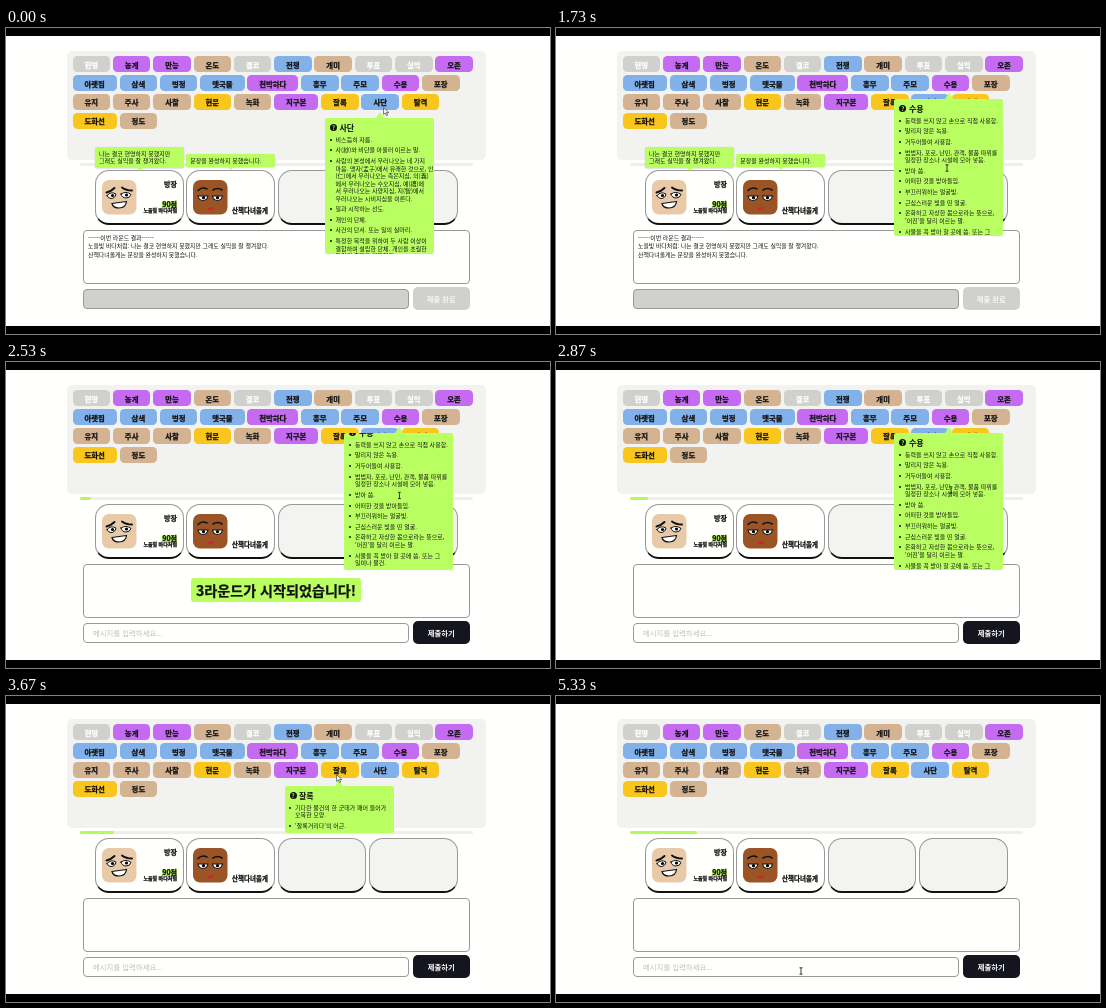
Recreate the animation shown at these times as an HTML page. Size 544 by 306 pixels, loop 5.39 s.

```html
<!DOCTYPE html>
<html lang="ko">
<head>
<meta charset="utf-8">
<title>Word game</title>
<style>
html, body { margin: 0; width: 100%; height: 100%; overflow: hidden; background: #000; }
#stage { position: absolute; left: 0; top: 0; width: 544px; height: 306px; overflow: hidden; background: #000;
  font-family: "Noto Sans CJK KR", "Noto Sans CJK", "Noto Sans", sans-serif; font-size: 6px; color: #111; }
#stage div, #stage svg { position: absolute; box-sizing: border-box; white-space: pre; }
.mid { display: flex; align-items: center; justify-content: center; }
.heavy { font-weight: 900; -webkit-text-stroke: .25px; }
.chip { border-radius: 4.5px; font-size: 7.4px; }
.card { border: 1px solid #999; border-bottom: 2px solid #111; border-radius: 14px; }
.right { text-align: right; line-height: 8px; }
.bubble, .tip { background: #baff62; font-weight: 500; }
.bubble { border-radius: 2px; line-height: 7.8px; padding: 3px 4px; box-shadow: 0 .5px 1.5px #0003; }
.bubble::after { content: ""; position: absolute; left: 42px; top: 100%; border: 3px solid transparent;
  border-top-color: #baff62; border-bottom: 0; }
.tip { border-radius: 2px; }
.tip::before { content: ""; position: absolute; left: 50%; top: -6px; margin-left: -4px;
  border: 4px solid transparent; border-bottom: 6px solid #baff62; border-top: 0; }
.clip { inset: 0; overflow: hidden; }
.dot { border-radius: 50%; background: #111; }
.line { line-height: 7.5px; }
</style>
</head>
<body>
<div id="stage"></div>
<script>
const LOOP = 5390, ROUND = 1970, BANNER_END = 2700;
const stage = document.getElementById('stage');

function box(x, y, w, h, css = '', text = '', cls = '', parent = stage) {
  const el = document.createElement('div');
  el.className = cls;
  el.style.cssText = `left:${x}px;top:${y}px;width:${w}px;height:${h}px;${css}`;
  el.textContent = text;
  parent.append(el);
  return el;
}

function svg(x, y, w, h, body) {
  stage.insertAdjacentHTML('beforeend',
    `<svg style="left:${x}px;top:${y}px" width="${w}" height="${h}" viewBox="0 0 ${w} ${h}">${body}</svg>`);
  return stage.lastElementChild;
}

const show = (el, on) => { el.style.visibility = on ? 'visible' : 'hidden'; };

box(0, 8, 544, 290, 'background:#fffffd');
box(61, 23, 419, 109, 'background:#f2f2f0;border-radius:5px');

// Word chips: a colour letter, then the word
const COLORS = { g: '#d0d0cd', p: '#c56bf2', b: '#82b1e9', t: '#d3b391', y: '#f9c61e' };
const ROWS = [
  'g현명 p농게 p만능 t온도 g결코 b전쟁 t개미 g투표 g실익 p오존',
  'b아랫집 b삼색 b병정 b맷국물 p천박하다 b흥부 b주모 p수용 t포장',
  't유지 t주사 t사찰 y현문 t녹화 p지구본 y잘록 b사단 y탈격',
  'y도화선 t정도'
];
ROWS.forEach((row, i) => {
  let x = 66.6;
  for (const item of row.split(' ')) {
    const kind = item[0], word = item.slice(1), w = 24 + 6.75 * word.length;
    box(x, 28.3 + i * 18.75, w, 16, `background:${COLORS[kind]};color:${kind === 'g' ? '#fff' : '#111'}`, word, 'chip heavy mid');
    x += w + 2.8;
  }
});

// Timer
box(74, 134.6, 393, 3.6, 'background:#eeeeec;border-radius:2px');
const bar = box(74, 134.6, 0, 3.6, 'background:#b6f95f;border-radius:2px');

// Player cards
[89, 180.3, 271.7, 363].forEach((x, i) =>
  box(x, 141.8, 88.6, 55.6, `background:${i < 2 ? '#fffffd' : '#f3f3f1'}`, '', 'card'));
svg(96, 152, 35, 35, `<rect width="34.5" height="34.5" rx="7" fill="#e9caa8"/>
  <g fill="none" stroke="#111" stroke-linecap="round">
  <path d="M4.5 12.5Q9 11.5 12.5 8M20 7.5Q24 10.5 30 10.5" stroke-width="2"/>
  <path d="M5 15.5Q9 11 14 14Q13 18.5 9 18.5Q6 18.5 5 15.5ZM19 14Q24 10.5 29 14.5Q28 18 24 18Q20 18 19 14Z" fill="#fff" stroke-width="1"/>
  <path d="M10 23.5Q17 22.5 24.5 21.5Q24 27.5 17 28Q11 28 10 23.5Z" fill="#fff" stroke-width="1.2"/></g>
  <circle cx="10.5" cy="15.5" r="1.6"/><circle cx="24.5" cy="15" r="1.6"/>`);
svg(187.3, 152, 35, 35, `<rect width="34.5" height="34.5" rx="7" fill="#9a5426"/>
  <g stroke="#111" stroke-linecap="round">
  <path d="M5 10.5Q9 6.5 14 9M20 10Q25 7 29 10" fill="none" stroke-width="1.6"/>
  <path d="M5 16H15Q14 20.5 10 20.5Q6 20.5 5 16ZM19.5 16H29.5Q28.5 20.5 24.5 20.5Q20.5 20.5 19.5 16Z" fill="#fff" stroke-width="1.1"/></g>
  <circle cx="10.5" cy="17.7" r="1.6"/><circle cx="24.5" cy="17.7" r="1.6"/>
  <path d="M14 28.5Q17 26 21.5 27.5Q20 30.5 17 30.5Q15 30.5 14 28.5Z" fill="#c92a2e"/>`);
box(131, 152, 40, 8, 'font-size:7px', '방장', 'right heavy');
box(155.5, 173.5, 15.5, 6.5, 'background:#b6f95f');
box(131, 172, 40, 8, 'font-size:7px', '90점', 'right heavy');
box(121, 178, 50, 8, 'font-size:5px', '노을빛 바다처럼', 'right heavy');
box(212, 178, 50, 8, 'font-size:6.5px', '산책다녀올게', 'right heavy');

// Chat, input and button
const frame = 'border:1px solid #999;border-radius:4px;';
box(77, 201.8, 387, 54.6, frame + 'background:#fffffd');
const sentence = ['나는 결코 현명하지 못했지만', '그래도 실익을 잘 챙겨왔다.'];
const failed = '문장을 완성하지 못했습니다.';
const chat = box(82, 205.6, 375, 30, 'font-size:5.9px;line-height:8.6px;font-weight:500',
  `------이번 라운드 결과------\n노을빛 바다처럼: ${sentence.join(' ')}\n산책다녀올게는 ${failed}`);
const bubbles = [
  box(89, 118.6, 88.5, 21, '', sentence.join('\n'), 'bubble'),
  box(180.3, 126, 88.5, 13.3, '', failed, 'bubble')
];
const input = box(77, 260.6, 326, 20.6, frame);
const hint = box(87, 265, 150, 11, 'font-size:7.4px;line-height:11px;color:#bdbdbb', '메시지를 입력하세요...');
const caret = box(87, 266, .8, 9, 'background:#222');
const button = box(406.8, 259.2, 57, 23, 'border-radius:5px;font-size:7.3px;font-weight:700', '', 'mid');
const banner = box(185, 216.4, 170, 24, 'background:#baff62;border-radius:3px;font-size:14.1px;padding-bottom:1px',
  '3라운드가 시작되었습니다!', 'heavy mid');

// Tooltips: x, y, w, h, from, to, title, entries
const TIPS = [
  [319, 90, 109, 136, 0, 850, '사단', [
    '비스듬히 자름.', '사(紗)와 비단을 아울러 이르는 말.',
    '사람의 본성에서 우러나오는 네 가지\n마음. 맹자(孟子)에서 유래한 것으로, 인\n(仁)에서 우러나오는 측은지심, 의(義)\n에서 우러나오는 수오지심, 예(禮)에\n서 우러나오는 사양지심, 지(智)에서\n우러나오는 시비지심을 이른다.',
    '일과 시작하는 선도.', '개인의 단체.', '사건의 단서. 또는 일의 실마리.',
    '특정한 목적을 위하여 두 사람 이상이\n결합하여 설립한 단체. 개인을 초월한\n독립된 존재로 활동한다.']],
  [338.4, 71, 109, 137, 1100, 3220, '수용', [
    '동력을 쓰지 않고 손으로 직접 사용함.', '말리지 않은 녹용.', '거두어들여 사용함.',
    '범법자, 포로, 난민, 관객, 물품 따위를\n일정한 장소나 시설에 모아 넣음.',
    '받아 씀.', '어떠한 것을 받아들임.', '부끄러워하는 얼굴빛.', '근심스러운 빛을 띤 얼굴.',
    "온화하고 자상한 몸으로라는 뜻으로,\n'어진'을 달리 이르는 말.",
    '사물을 꼭 받아 할 곳에 씀. 또는 그\n일이나 물건.', '수척한 얼굴.']],
  [278.5, 90, 109.5, 46.6, 3460, 4330, '잘록', [
    '기다란 물건의 한 군데가 패어 들어가\n오목한 모양.', "'잘록거리다'의 어근."]]
].map(([x, y, w, h, from, to, title, entries]) => {
  const el = box(x, y, w, h, '', '', 'tip');
  const clip = box(0, 0, w, h, '', '', 'clip', el);
  const body = box(0, 0, w, h, '', '', '', clip);
  box(5, 5.5, 7, 7, 'background:#111;border-radius:50%;color:#baff62;font-size:6px;font-weight:900', '?', 'mid', body);
  box(14.5, 3.8, 60, 11, 'font-size:8px;line-height:11px;font-weight:700', title, '', body);
  let top = 17.7;
  for (const entry of entries) {
    const rows = entry.split('\n').length * 7.5;
    box(4.7, top + 3, 2, 2, '', '', 'dot', body);
    box(10.6, top, w - 10, rows, '', entry, 'line', body);
    top += rows + 3.15;
  }
  return { el, body, from, to };
});

const arrow = svg(0, 0, 8, 10, '<path d="M.6.6V7.4L2.3 5.9L3.5 8.6L4.7 8L3.5 5.5H5.8Z" fill="#fff" stroke="#222" stroke-width=".6"/>');
const beam = svg(0, 0, 6, 8, '<path d="M1.5.8H4.5M3 .8V7.2M1.5 7.2H4.5" fill="none" stroke="#111" stroke-width=".8"/>');

// Pointer keys: time, x, y
const PATH = [
  [0, 377, 79], [500, 378, 77], [930, 379, 64], [1150, 386, 59], [1400, 391, 115], [1730, 391, 140],
  [2070, 391, 142], [2870, 395, 128], [3200, 388, 68], [3450, 340, 76], [3670, 330, 78],
  [4250, 331, 80], [4600, 290, 150], [5000, 252, 256], [5200, 245, 275], [LOOP, 245, 275]
];
const SCROLL = [[0, 0], [1900, 0], [2060, 21.4], [2400, 21.4], [2650, 0], [LOOP, 0]];

function at(keys, t, col) {
  const i = Math.max(1, keys.findIndex(k => k[0] >= t));
  const a = keys[i - 1], b = keys[i];
  const p = (t - a[0]) / (b[0] - a[0]);
  return a[col] + (b[col] - a[col]) * p * p * (3 - 2 * p);
}

function draw(t) {
  const live = t >= ROUND;
  show(chat, !live);
  bubbles.forEach(b => show(b, !live));
  show(hint, live);
  show(caret, live && t < 2400);
  show(banner, live && t < BANNER_END);
  bar.style.width = Math.max(0, (t - ROUND) * .02) + 'px';
  input.style.background = live ? '#fffffd' : '#d0d0cd';
  button.style.background = live ? '#15151f' : '#d0d0cd';
  button.style.color = live ? '#fff' : '#f5f5f3';
  button.textContent = live ? '제출하기' : '제출 완료';
  TIPS.forEach(tip => show(tip.el, t >= tip.from && t < tip.to));
  TIPS[1].body.style.top = -at(SCROLL, t, 1) + 'px';

  const x = at(PATH, t, 1), y = at(PATH, t, 2);
  const typing = y > 261 || (t > 1300 && t < 3150 && y > 86);
  show(arrow, !typing);
  show(beam, typing);
  arrow.style.transform = `translate(${x}px,${y}px)`;
  beam.style.transform = `translate(${x - 3}px,${y - 4}px)`;
}

function tick() {
  draw(performance.now() % LOOP);
  requestAnimationFrame(tick);
}
tick();
</script>
</body>
</html>
```
